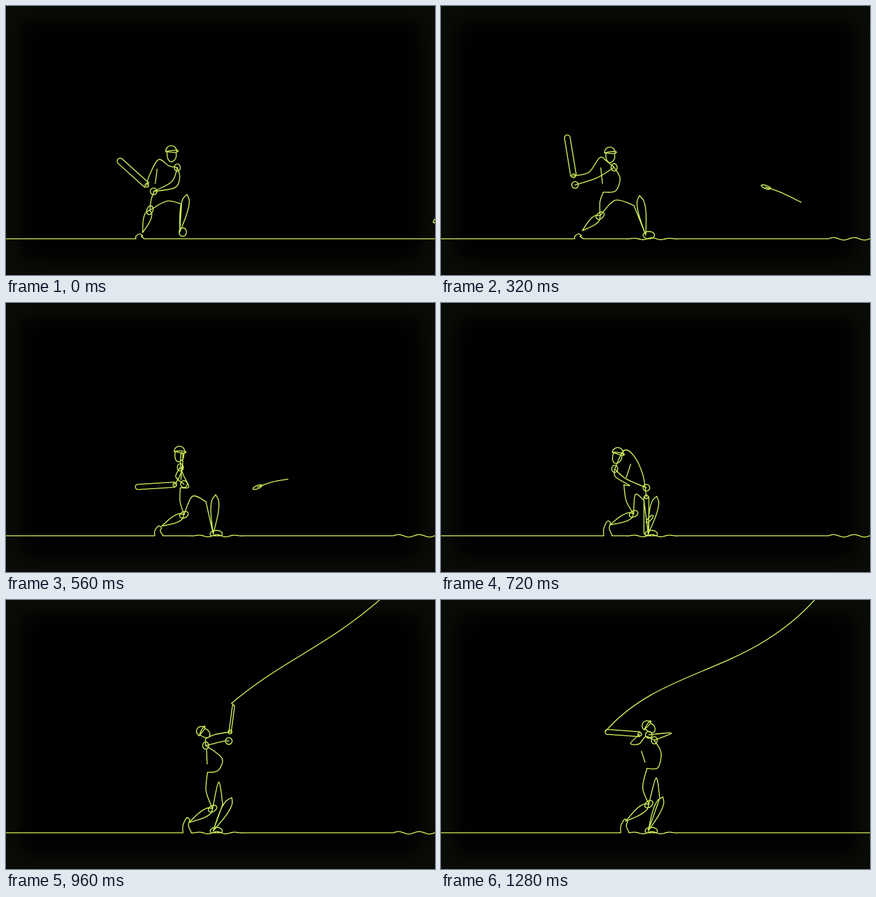
Write an HTML page with a canvas that moves like this. It is 705 px wide and 442 px high and loops after 1360 ms.

```html
<!DOCTYPE html>
<html lang="en">
<head>
<meta charset="utf-8">
<title>Batter</title>
<style>
html, body { margin: 0; width: 100%; height: 100%; overflow: hidden; background: #000; }
canvas { display: block; width: 705px; height: 442px; background: #000; box-shadow: inset 0 0 32px 26px #0a0c07; }
</style>
</head>
<body>
<canvas id="stage" width="705" height="442"></canvas>
<script>
const STEP = 80, STEPS = 17, WIDTH = 705, HEIGHT = 442, GROUND = 382;
const BOUNCE = 1, HIT = 9, LIFT = 11, FOLLOW = 14;
const ctx = document.getElementById('stage').getContext('2d');

// Joints of the batter; look = head tilt and size, bat = angle, length, width.
// A pose keeps whatever it does not state from the one before.
const poses = [
  { step: 0, head: [271, 238], look: [0, 1], neck: [267, 262], backShoulder: [250, 252], backElbow: [235, 278],
    hand: [231, 294], bat: [-138, 64, 10], shoulder: [281, 265], elbow: [272, 288], chest: [285, 281],
    belly: [277, 298], hip: [243, 304], thigh: [238, 318], knee: [236, 335], ankle: [224, 372], shoe: [219, 374],
    crotch: [264, 320], groin: [288, 325], pad: [297, 309], toe: [290, 371], toeSize: [6, 7] },
  { step: 2, head: [273, 238], neck: [267, 257], backShoulder: [253, 250], backElbow: [238, 274],
    hand: [218, 280], bat: [-104, 70, 10], shoulder: [278, 260], elbow: [258, 282], chest: [285, 279],
    belly: [277, 300], hip: [255, 300], thigh: [248, 315], knee: [247, 334], ankle: [227, 370], shoe: [222, 374],
    crotch: [271, 316], groin: [304, 326], pad: [309, 309], toe: [333, 370], toeSize: [8, 6] },
  { step: 5, head: [279, 241], look: [0, 0.95], neck: [274, 253], backShoulder: [264, 248], backElbow: [245, 272],
    hand: [217, 278], bat: [-97, 67, 9], shoulder: [287, 267], elbow: [254, 282], chest: [298, 284],
    belly: [291, 305], hip: [272, 308], thigh: [267, 325], knee: [268, 349], ankle: [234, 368], shoe: [227, 374],
    crotch: [293, 320], groin: [323, 328], pad: [334, 312], toe: [345, 379], toeSize: [10, 6] },
  { step: 9, head: [290, 246], look: [15, 1], neck: [300, 242], backShoulder: [316, 250], backElbow: [331, 281],
    hand: [337, 318], bat: [-270, 63, 8], shoulder: [285, 272], elbow: [303, 288], chest: [286, 285],
    belly: [309, 299], hip: [300, 298], thigh: [304, 325], knee: [316, 346], ankle: [277, 364], shoe: [273, 358],
    crotch: [319, 314], groin: [333, 324], pad: [354, 317] },
  { step: 11, head: [311, 220], look: [-60, 1], neck: [323, 234], backShoulder: [329, 222], backElbow: [356, 214],
    hand: [388, 218], bat: [-398, 42, 0.5], shoulder: [318, 243], elbow: [346, 239], chest: [351, 264],
    belly: [344, 282], hip: [327, 286], thigh: [327, 316], knee: [338, 346], ankle: [299, 366], shoe: [295, 357],
    crotch: [347, 302], groin: [354, 340], pad: [374, 325] },
  { step: 14, head: [340, 206], look: [-50, 0.7], neck: [336, 224], backShoulder: [327, 238], backElbow: [315, 234],
    hand: [327, 213], bat: [-531, 49, 10], shoulder: [347, 230], elbow: [376, 217], chest: [361, 250],
    belly: [356, 275], hip: [338, 276], thigh: [331, 308], knee: [341, 335], ankle: [303, 363], shoe: [299, 359],
    crotch: [353, 292], groin: [359, 325], pad: [364, 323] },
  { step: 16, head: [338, 206], look: [-50, 0.9], backShoulder: [325, 236], backElbow: [311, 235],
    hand: [326, 220], bat: [-536, 57, 8], shoulder: [350, 230], elbow: [378, 218], shoe: [301, 360] }
];
for (let i = 1; i < poses.length; i++) poses[i] = { ...poses[i - 1], ...poses[i] };

const clamp = (v, lo, hi) => Math.max(lo, Math.min(hi, v));
const mix = (a, b, t) => a.map((v, i) => v + (b[i] - v) * t);
const polar = ([x, y], deg, r) => [x + r * Math.cos(deg * Math.PI / 180), y + r * Math.sin(deg * Math.PI / 180)];

function poseAt(step) {
  const i = Math.max(1, poses.findIndex(p => p.step >= step));
  const a = poses[i - 1], b = poses[i], t = (step - a.step) / (b.step - a.step);
  const pose = {};
  for (const name in b) if (name !== 'step') pose[name] = mix(a[name], b[name], t);
  return pose;
}

// Smooth curve through points
function curve(...p) {
  ctx.moveTo(...p[0]);
  for (let i = 0; i < p.length - 1; i++) {
    const a = p[i - 1] || p[i], b = p[i], c = p[i + 1], d = p[i + 2] || c;
    ctx.bezierCurveTo(b[0] + (c[0] - a[0]) / 6, b[1] + (c[1] - a[1]) / 6,
      c[0] - (d[0] - b[0]) / 6, c[1] - (d[1] - b[1]) / 6, ...c);
  }
}

function ring([x, y], rx, ry = rx, angle = 0) {
  ctx.moveTo(x + rx * Math.cos(angle), y + rx * Math.sin(angle));
  ctx.ellipse(x, y, rx, ry, angle, 0, 2 * Math.PI);
}

// Run a drawing in a frame placed at a point and turned
function placed([x, y], deg, scale, paint) {
  ctx.save();
  ctx.translate(x, y);
  ctx.rotate(deg * Math.PI / 180);
  ctx.scale(scale, scale);
  paint();
  ctx.restore();
}

// Loop from a to b, widest near a
function leaf(a, b, width) {
  const dx = b[0] - a[0], dy = b[1] - a[1], len = Math.hypot(dx, dy);
  const side = sign => Array.from({ length: 9 }, (_, i) => {
    const t = i / 8, w = sign * width * Math.sin(Math.PI * t ** 0.6);
    return [a[0] + dx * t - dy / len * w, a[1] + dy * t + dx / len * w];
  });
  curve(...side(1));
  curve(...side(-1));
}

function drawHead({ head, look }) {
  placed(head, look[0], look[1], () => {
    ctx.moveTo(-9, 1);
    ctx.arc(0, 0, 9, Math.PI, 2 * Math.PI);
    curve([-9, 1], [0, -1], [11, -1], [7, 2], [-9, 1]);
    curve([-7, 2], [-6, 11], [-2, 17], [4, 16], [8, 10], [8, 2]);
  });
}

function drawBat({ hand, bat: [deg, len, width] }) {
  const r = width / 2;
  placed(hand, deg, 1, () => {
    ctx.moveTo(0, r);
    ctx.lineTo(len - r, r);
    ctx.arc(len - r, 0, r, Math.PI / 2, -Math.PI / 2, true);
    ctx.lineTo(0, -r);
  });
}

function drawBody(p) {
  const glove = polar(p.hand, p.bat[0], -15);
  curve(p.hand, p.backElbow, p.backShoulder, p.neck, p.shoulder);
  curve(p.shoulder, p.elbow, glove);
  curve(p.shoulder, p.chest, p.belly, p.hip);
  curve(mix(p.backShoulder, p.hip, 0.3), mix(p.backShoulder, p.hip, 0.75));
  ring(p.shoulder, 5, 6);
  ring(p.hand, 3);
  ring(glove, 5.5);
}

function drawLegs(p) {
  const shin = Math.atan2(p.ankle[1] - p.knee[1], p.ankle[0] - p.knee[0]);
  const [x, y] = p.shoe, mid = (y + GROUND) / 2;
  curve(p.hip, p.thigh, p.knee);
  ring(p.knee, 7.5, 5, shin);
  leaf(p.knee, p.ankle, 6);
  curve([x - 6, GROUND], [x - 6, mid], [x, y], [x + 5, y + 3], [x + 3, mid], [x + 8, GROUND]);
  curve(p.knee, p.crotch, p.groin);
  const foot = [p.toe[0] - 5, p.toe[1]];
  curve(p.groin, foot);
  leaf(p.pad, foot, 6.5);
  for (let a = 0; a <= 360; a += 10) {
    const [c, s] = polar([0, 0], a, 1);
    ctx[a ? 'lineTo' : 'moveTo'](p.toe[0] + p.toeSize[0] * c, Math.min(GROUND, p.toe[1] + p.toeSize[1] * s));
  }
}

// Flat line with a gap at the back shoe and ripples at the front foot and the bounce
function drawGround(step, { shoe }) {
  const start = Math.max(636, 655 - 5 * step);
  const far = 2 * Math.min(1, step / 4, (16 - step) / 4), near = 2 * Math.min(1, step / 5);
  ctx.moveTo(0, GROUND);
  for (let x = 1; x <= WIDTH; x++) {
    const d = x - 346;
    let y = GROUND;
    if (x > start) y -= far * Math.sin((x - start) * Math.PI / 17);
    else if (Math.abs(d) < 44) y -= near * Math.cos(d * Math.PI / 15) * Math.cos(d * Math.PI / 88);
    const gap = x > shoe[0] - 6 && x < shoe[0] + 8;
    ctx[gap ? 'moveTo' : 'lineTo'](x, y);
  }
}

// Straight in, a parabola after the bounce, straight out after the hit
function ballAt(step) {
  const u = step - BOUNCE, k = step - HIT;
  if (u < 0) return [672 - 36 * u, 380 + 30 * u];
  if (k <= 0) return [672 - 49.2 * u + u * u, 380 - 42.4 * u + 4.9 * u * u];
  return [342 + 118 * k, 355 - 162.5 * k];
}

function drawBall(step) {
  if (step > LIFT) return;
  const ball = ballAt(step), before = ballAt(step - 0.2);
  ring(ball, 8, 2.6, Math.atan2(ball[1] - before[1], ball[0] - before[0]));
  if (step < HIT) {
    const from = step > BOUNCE ? Math.max(BOUNCE, step - 1.3) : step - 1;
    curve(ball, ballAt((from + step) / 2), ballAt(from));
  }
}

// Line from the bat to the ball, bending as the bat follows through
function drawTrail(step, { hand, bat }) {
  if (step <= HIT) return;
  const tip = polar(hand, bat[0], bat[1]);
  const end = step > LIFT ? [613, 0] : ballAt(step);
  const bend = clamp((step - LIFT) / (FOLLOW - LIFT), 0, 1);
  const start = mix([tip[0] - 5, tip[1] - 5], tip, bend);
  ctx.moveTo(...tip);
  ctx.lineTo(...start);
  ctx.bezierCurveTo(
    ...mix(mix(start, end, 1 / 3), [tip[0] + 93, tip[1] - 107], bend),
    ...mix(mix(start, end, 2 / 3), [500, 124], bend), ...end);
}

function draw(step) {
  const pose = poseAt(step);
  ctx.setTransform(1, 0, 0, 1, 0, 0);
  ctx.clearRect(0, 0, WIDTH, HEIGHT);
  ctx.translate(0.5, 0.5);
  ctx.strokeStyle = '#c8e858';
  ctx.lineWidth = 1.6;
  ctx.lineCap = ctx.lineJoin = 'round';
  ctx.beginPath();
  drawGround(step, pose);
  drawLegs(pose);
  drawBody(pose);
  drawHead(pose);
  drawBat(pose);
  drawBall(step);
  drawTrail(step, pose);
  ctx.stroke();
}

const begin = performance.now();
let shown = -1;
function tick() {
  const step = Math.floor((performance.now() - begin) / STEP) % STEPS;
  if (step !== shown) draw(shown = step);
  requestAnimationFrame(tick);
}
tick();
</script>
</body>
</html>
```
